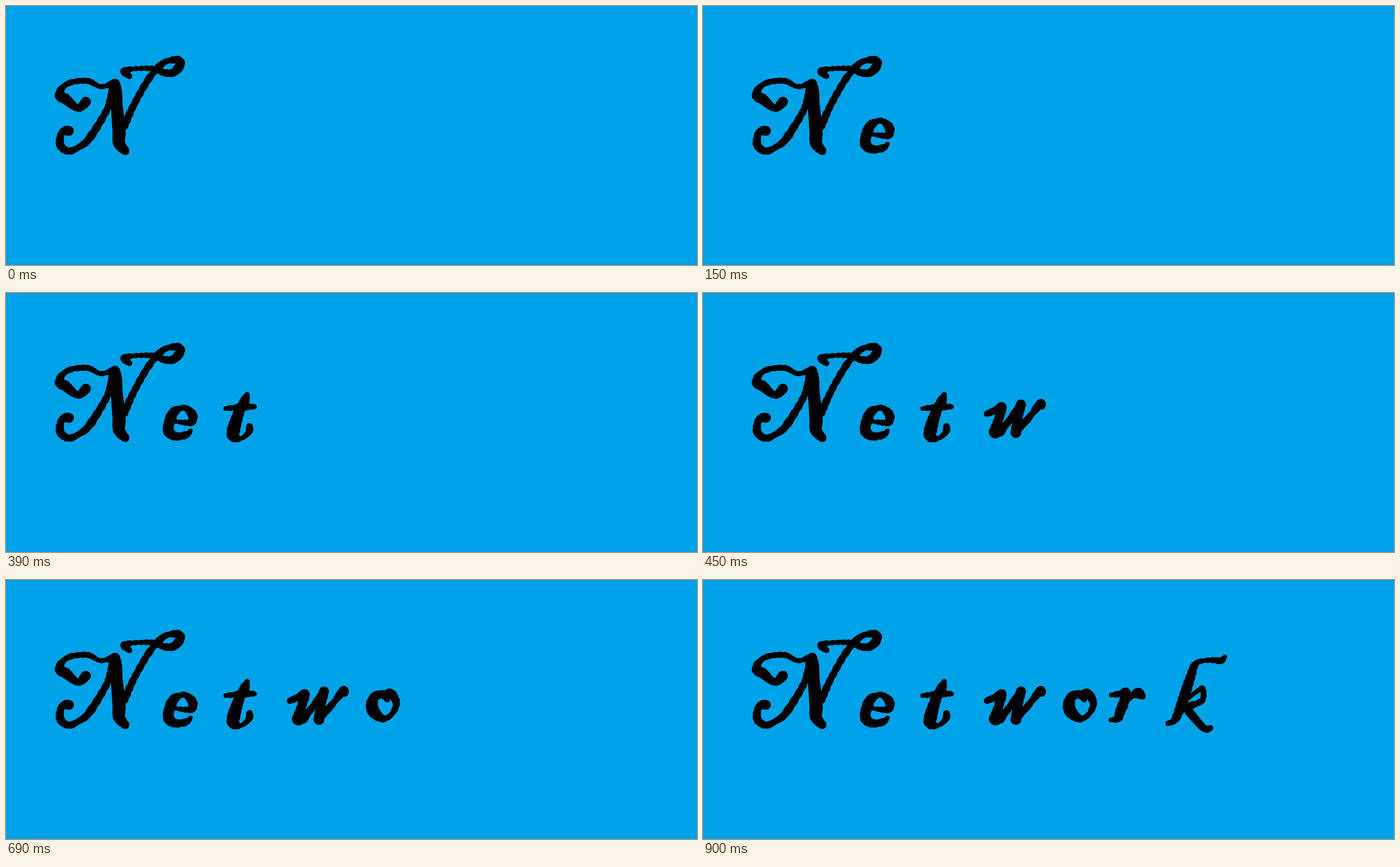
Animation of 1186x446 px, one loop 1.05 s. Source, as an HTML page with a canvas:

```html
<!DOCTYPE html>
<html lang="en">
<head>
<meta charset="utf-8">
<title>Network</title>
<style>
  html, body { margin: 0; width: 100%; height: 100%; overflow: hidden; background: #00a2e8; }
  canvas { display: block; }
</style>
</head>
<body>
<canvas width="1186" height="446" role="img" aria-label="Network"></canvas>
<script>
  const canvas = document.querySelector('canvas');
  const ctx = canvas.getContext('2d');
  const STEP = 150;
  const letters = [];
  let pen;

  const letter = () => letters.push(pen = new Path2D());

  // Catmull-Rom blend of four knots
  const blend = (a, b, c, d, t) =>
    b + t / 2 * (c - a + t * (2 * a - 5 * b + 4 * c - d + t * (3 * (b - c) + d - a)));

  // Brush stroke through knots of x, y, radius, with a slightly ragged edge
  function stroke(...values) {
    const count = values.length / 3;
    const knot = i => {
      const k = 3 * Math.max(0, Math.min(count - 1, i));
      return values.slice(k, k + 3);
    };
    for (let i = 0; i < count - 1; i++) {
      const [a, b, c, d] = [-1, 0, 1, 2].map(n => knot(i + n));
      const steps = Math.ceil(Math.hypot(c[0] - b[0], c[1] - b[1]));
      for (let s = 0; s <= steps; s++) {
        const [x, y, r] = [0, 1, 2].map(n => blend(a[n], b[n], c[n], d[n], s / steps));
        const radius = Math.max(1, r + 0.5 * Math.sin(x * 0.7 + y * 0.9));
        pen.moveTo(x + radius, y);
        pen.arc(x, y, radius, 0, 2 * Math.PI);
      }
    }
  }

  letter(); // N: swash, left leg, stem, right leg with loop
  stroke(137,165,9, 123,176,6, 102,160,9, 92,155,8, 95,143,6, 110,132,5, 140,129,5, 163,139,4, 186,132,6);
  stroke(186,133,8, 179,160,6, 171,183,6, 143,228,7, 125,243,6, 107,250,6, 93,239,7, 96,217,6, 108,215,9);
  stroke(188,132,7, 189,148,10, 190,170,10, 194,215,11, 194,236,10, 205,250,7);
  stroke(203,206,7, 218,173,6, 236,140,6, 249,120,6, 263,104,6, 276,95,5, 294,93,7, 299,101,8,
    288,114,7, 272,115,6, 253,108,5, 222,108,4, 202,112,6, 212,121,5);

  letter(); // e
  stroke(290,221,3, 317,223,6, 320,210,8, 308,198,5, 296,200,6, 286,208,9,
    279,228,9, 280,240,9, 292,247,7, 310,244,6, 317,237,3);

  letter(); // t
  stroke(414,175,4, 410,185,8, 400,205,9, 390,238,11, 392,249,8, 405,250,4, 417,239,6, 418,230,6);
  stroke(377,199,4, 410,196,6, 427,196,4);

  letter(); // w
  stroke(487,208,5, 502,202,7, 513,197,8, 507,219,8, 502,239,11);
  stroke(511,241,6, 525,220,6, 539,202,7, 546,192,8, 541,212,8, 537,240,9);
  stroke(544,233,6, 556,219,6, 568,204,6, 579,190,8, 581,194,7);

  letter(); // o
  stroke(655,207,4, 646,197,7, 633,201,8, 628,214,10, 632,228,10, 648,239,6, 663,230,5,
    670,212,6, 661,196,8, 650,198,7);

  letter(); // r
  stroke(701,198,4, 716,196,6, 727,193,7, 721,214,9, 714,232,8, 713,239,6, 700,241,4);
  stroke(726,208,6, 736,199,6, 747,195,9, 755,201,5);

  letter(); // k: stem, then bowl and leg
  stroke(896,132,4, 889,139,6, 877,138,5, 859,139,4, 845,145,6, 837,166,8, 825,203,9, 811,239,7, 798,247,4);
  stroke(831,204,5, 845,194,4, 857,187,5, 857,207,5, 833,220,7, 843,237,7, 861,256,6, 871,255,5);

  function draw(now) {
    const shown = 1 + Math.floor(now / STEP) % letters.length;
    ctx.fillStyle = '#00a2e8';
    ctx.fillRect(0, 0, canvas.width, canvas.height);
    ctx.fillStyle = '#000';
    letters.slice(0, shown).forEach(path => ctx.fill(path));
  }

  const start = performance.now();
  function tick() {
    draw(performance.now() - start);
    requestAnimationFrame(tick);
  }
  tick();
</script>
</body>
</html>
```
